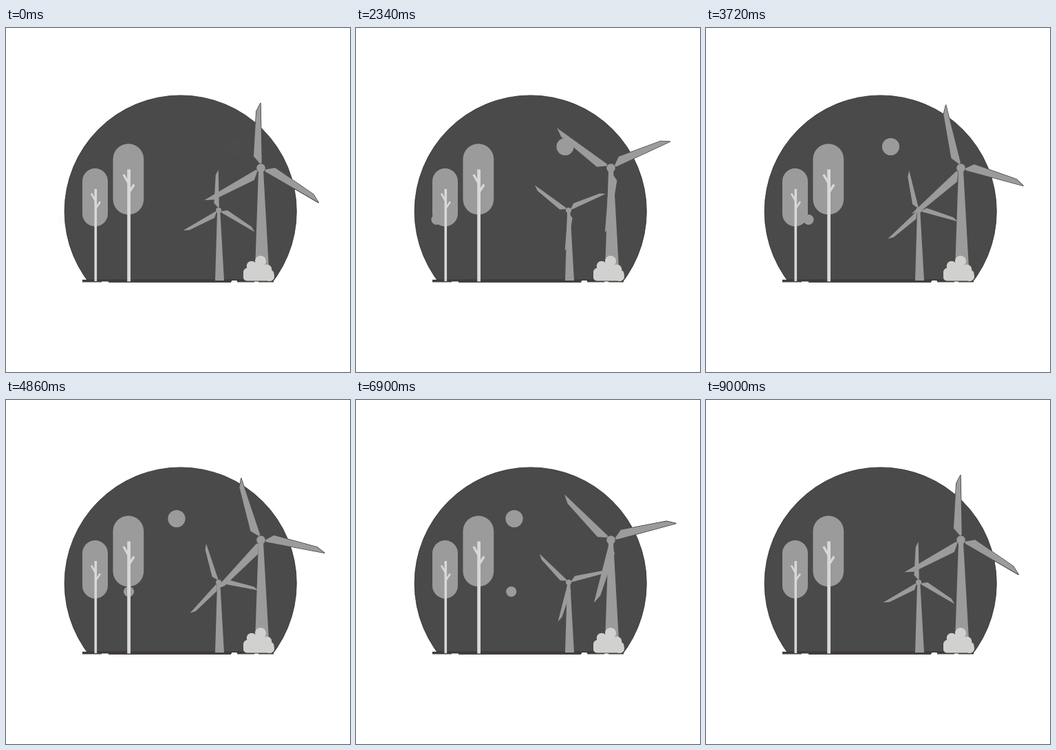
Animation of 500x500 px, one loop 9030 ms. Source, as an HTML page:

```html
<!DOCTYPE html>
<html lang="en">
<head>
<meta charset="utf-8">
<title>Wind turbines</title>
<style>
  html, body { margin: 0; width: 100%; height: 100%; overflow: hidden; background: #fff; }
  svg { display: block; width: 100%; height: 100%; }
  .grey { fill: #9b9b9b; }
  .trunk { stroke: #d8d8d8; fill: none; }
  .edge { stroke: #222; stroke-width: 1.2; }
</style>
</head>
<body>
<svg viewBox="0 0 500 500">
  <defs>
    <path id="blade" d="M-.5-94.5L-6.8-82L-10.5-17L-1-6L1.2-8Z"/>
    <g id="rotor">
      <use href="#blade"/>
      <use href="#blade" transform="rotate(121.3) scale(1.035)"/>
      <use href="#blade" transform="rotate(240.7)"/>
    </g>
    <clipPath id="horizon"><rect width="500" height="367"/></clipPath>
  </defs>

  <g transform="translate(370.5 203.5)"><use class="spin grey edge" href="#rotor"/></g>
  <path id="speck" d="M86 277L81 282L80 287L86 288Z" fill="#3a3a3a"/>

  <circle cx="253.7" cy="266.5" r="168.6" fill="#4a4a4a" stroke="#2b2b2b" stroke-width=".8" clip-path="url(#horizon)"/>
  <path d="M111 366H329L327 370H149V368.6H139V369.6H111ZM335 366H389V369.6H367V368.4H361V369.6H336Z" fill="#453f41"/>
  <path d="M111 366.3H389" stroke="#2f2b2c" stroke-width=".8"/>
  <path d="M329 367H335L336.500 370H327Z" fill="#fff"/>

  <circle id="sun" class="grey" cy="172.500" r="12.600"/>
  <circle id="pebble" class="grey" cy="278.500" r="7.600"/>

  <rect class="grey" x="111" y="204" width="37" height="84.500" rx="18.500"/>
  <rect class="grey" x="155.500" y="168.300" width="44.700" height="103" rx="22.300"/>
  <path class="trunk" stroke-width="3.600" d="M130.300 234V368"/>
  <path class="trunk" stroke-width="2.600" d="M124 240.500L130 251M137 252.500L130.500 262"/>
  <path class="trunk" stroke-width="4.800" d="M178.600 205.500V368.500"/>
  <path class="trunk" stroke-width="3.300" d="M170.800 213L178 225.500M186.200 227.500L178.800 239"/>

  <path class="grey" d="M307 267H311.300L317 367H304Z"/>
  <g transform="translate(309 265) scale(.625)">
    <use class="spin grey" href="#rotor"/>
    <circle class="grey" r="6.600"/>
  </g>

  <path class="grey" d="M367 207H374L383 366H361.500Z"/>
  <g transform="translate(370.500 203.500)">
    <use class="spin grey" href="#rotor"/>
    <circle class="grey" r="6.300"/>
  </g>

  <g fill="#d1d1cf">
    <rect x="345" y="352" width="44.500" height="15.500" rx="5"/>
    <circle cx="370" cy="339" r="8"/>
    <circle cx="357" cy="346" r="7.300"/>
    <circle cx="379" cy="351" r="7.300"/>
    <circle cx="351.500" cy="355" r="6.500"/>
    <circle cx="383" cy="361" r="7"/>
    <circle cx="366" cy="353" r="11"/>
  </g>
</svg>
<script>
const LOOP = 9030, STEP = 30, TURNS = 4;
const sun = document.getElementById('sun');
const pebble = document.getElementById('pebble');
const speck = document.getElementById('speck');
const rotors = document.querySelectorAll('.spin');

// [time in ms, x]
const sunPath = [[0, 332], [960, 324.5], [2340, 304], [3720, 268.5],
  [4860, 248], [6900, 230], [7470, 228]];
const pebblePath = [[0, 82], [960, 95.5], [1890, 108.5], [2340, 117], [3720, 149],
  [4860, 178.5], [5610, 197.5], [6540, 218.5], [7470, 235.5], [8400, 246]];

const clamp = v => Math.min(1, Math.max(0, v));
const ramp = (t, from, to) => clamp((t - from) / (to - from));

// Bezier easing with flat ends; x1 and x2 set how long each end lingers
function ease(p, x1, x2) {
  let lo = 0, hi = 1;
  for (let i = 0; i < 30; i++) {
    const u = (lo + hi) / 2, v = 1 - u;
    const x = 3 * x1 * u * v * v + 3 * x2 * u * u * v + u ** 3;
    if (x < p) lo = u; else hi = u;
  }
  return lo * lo * (3 - 2 * lo);
}

// Smooth curve through the keys
function along(keys, t) {
  const last = keys.length - 1;
  if (t >= keys[last][0]) return keys[last][1];
  let i = 0;
  while (t >= keys[i + 1][0]) i++;
  const slope = k => {
    const a = keys[Math.max(0, k - 1)], b = keys[Math.min(last, k + 1)];
    return (b[1] - a[1]) / (b[0] - a[0]);
  };
  const [t0, a] = keys[i], [t1, b] = keys[i + 1];
  const d = t1 - t0, u = (t - t0) / d, v = 1 - u;
  return a * v * v * (1 + 2 * u) + b * u * u * (3 - 2 * u)
    + d * u * v * (slope(i) * v - slope(i + 1) * u);
}

function place(ball, path, t, fadeOut) {
  ball.setAttribute('cx', along(path, t).toFixed(2));
  ball.setAttribute('opacity', ramp(t, 0, 1400) * (1 - ramp(t, ...fadeOut)));
}

function draw(now) {
  const t = Math.max(0, Math.floor((now % LOOP) / STEP + 1e-6) * STEP - STEP);
  const angle = 360 * TURNS * ease(t / (LOOP - 2 * STEP), 0.568, 0.136);
  rotors.forEach(r => r.setAttribute('transform', `rotate(${angle.toFixed(2)})`));
  place(sun, sunPath, t + STEP, [6900, 7470]);
  place(pebble, pebblePath, t + STEP, [7300, 8400]);
  speck.setAttribute('visibility', t > 450 && t < 960 ? 'visible' : 'hidden');
}

const start = performance.now();
function tick() {
  draw(performance.now() - start);
  requestAnimationFrame(tick);
}
tick();
</script>
</body>
</html>
```
